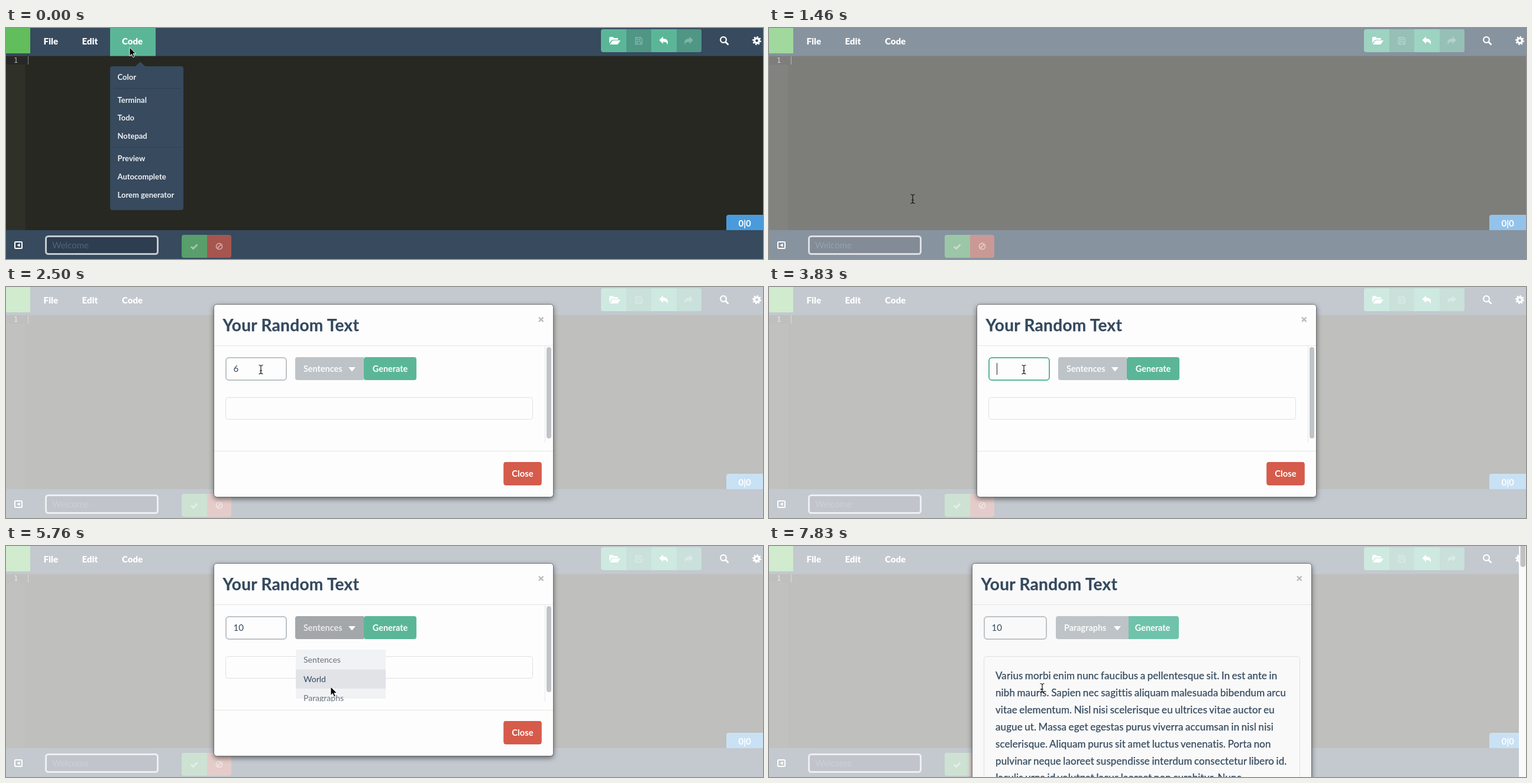
Animation, 1280 px wide and 392 px high, one loop 8000 ms. Source, as an HTML page:

```html
<!DOCTYPE html>
<html lang="en">
<head>
<meta charset="utf-8">
<title>Random text generator</title>
<style>
  html, body { margin: 0; width: 100%; height: 100%; overflow: hidden; background: #272822; }
  svg { display: block; width: 1280px; height: 392px; font-family: Lato, "Open Sans", sans-serif; }
  text { white-space: pre; }
  .nav { font-size: 15px; font-weight: 900; fill: #fff; }
  .item { font-size: 13px; font-weight: 700; fill: #eef1f3; }
  .btn { font-size: 14.4px; font-weight: 700; fill: #fff; }
  .field { font-size: 15px; fill: #34495e; }
  .opt { font-size: 14px; }
  .title { font-size: 28px; font-weight: 700; letter-spacing: .3px; fill: #34495e; }
  .lorem { font-size: 17px; letter-spacing: .1px; word-spacing: -1px; fill: #34495e; }
  .title, .lorem { stroke: #34495e; stroke-width: .25px; }
  #frame { stroke: #000; stroke-opacity: .45; filter: drop-shadow(0 3px 4.5px rgba(0, 0, 0, .5)); }
</style>
</head>
<body>
<svg viewBox="0 0 1280 392">
  <defs><clipPath id="bodyClip"><rect x="352" y="100" width="573" height="164"/></clipPath></defs>

  <!-- editor -->
  <rect width="1280" height="392" fill="#272822"/>
  <rect y="47" width="32.5" height="297" fill="#2f3129"/>
  <rect y="48" width="32.5" height="14" fill="#272727"/>
  <text x="13" y="59" font-size="12" fill="#b4b5ae" font-family="DejaVu Sans Mono, monospace">1</text>
  <rect x="37" y="48" width="1" height="14" fill="#86867f"/>
  <path d="M1218 343V321q0-4 4-4H1280V343z" fill="#4a9bdb"/>
  <text x="1238.5" y="336.5" font-size="15" font-weight="700" fill="#fff">0|0</text>

  <!-- header -->
  <rect width="1280" height="47.5" fill="#374a5e"/>
  <rect width="41" height="43" fill="#62bd5c"/>
  <rect id="codeTab" x="176" width="77" height="47.5" fill="#5bb698"/>
  <text class="nav" x="63.5" y="27.5">File</text>
  <text class="nav" x="128.5" y="27.5">Edit</text>
  <text class="nav" x="196" y="27.5">Code</text>
  <rect x="1006" y="2" width="170" height="39" rx="4" fill="#5bb698"/>
  <path d="M1049 2h42v39h-42zM1134 2h38q4 0 4 4v31q0 4-4 4h-38z" fill="#4f9685"/>
  <g fill="#fff">
    <path d="M1020 26V17q0-2 2-2h4l2 2h5q2 0 2 2v1h-9q-2 0-3 2z"/>
    <path d="M1021 28l4-6q.7-1 2-1h12l-4 6q-.7 1-2 1z"/>
    <path d="M1104.500 20.500l6.500-6v3.500c7 0 9.500 4 7.500 10.500c-.8-4-3-5-7.500-5v3.500z"/>
  </g>
  <path d="M1106 20.500l6.500-6v3.500c7 0 9.500 4 7.500 10.500c-.8-4-3-5-7.500-5v3.500z" fill="#80b5a8" transform="matrix(-1 0 0 1 2268 0)"/>
  <path d="M1064.500 16h8.500l2.500 2.500v9h-11zM1067 16v4h5v-4M1067 27v-4h6v4" fill="none" stroke="#80b5a8" stroke-width="1.5"/>
  <g fill="none" stroke="#fff">
    <circle cx="1213" cy="20" r="4.900" stroke-width="2.300"/>
    <path d="M1216.700 23.700l4 4" stroke-width="2.800" stroke-linecap="round"/>
    <circle cx="1269.500" cy="21.500" r="4" stroke-width="3.400"/>
    <circle cx="1269.500" cy="21.500" r="6.400" stroke-width="2.400" pathLength="16" stroke-dasharray="1"/>
  </g>

  <!-- footer -->
  <rect y="343" width="1280" height="49" fill="#374a5e"/>
  <rect x="15" y="363" width="12" height="11" rx="1.500" fill="none" stroke="#fff" stroke-width="2"/>
  <path d="M23.500 365.500v6l-5-3z" fill="#fff"/>
  <rect x="67.500" y="353.500" width="189" height="30" rx="4" fill="#2e3d50" stroke="#c5cbd1" stroke-width="3"/>
  <text x="78" y="374" font-size="15" fill="#50647a">Welcome</text>
  <path d="M340 351h-39q-4 0-4 4v31q0 4 4 4h39z" fill="#589f6c"/>
  <path d="M340 351h37q4 0 4 4v31q0 4-4 4h-37z" fill="#a6554f"/>
  <path d="M313 371l3.500 3.500l7-7" fill="none" stroke="#a5c9ae" stroke-width="2.800"/>
  <g fill="none" stroke="#cfa29e" stroke-width="1.900">
    <circle cx="360.500" cy="370.500" r="5"/><path d="M357 374l7-7"/>
  </g>

  <!-- drop-down menu -->
  <g id="menu">
    <path d="M217.500 66l9.500-8.500l9.500 8.500z" fill="#374a5e"/>
    <rect x="176" y="65" width="124" height="244" rx="4" fill="#374a5e"/>
    <path d="M180 102.500h116M180 202.500h116" stroke="#2f4154"/>
    <rect id="menuHit" x="180" width="116" height="31" rx="4" fill="#5bb698"/>
    <g id="menuItems"></g>
  </g>

  <rect id="veil" width="1280" height="392" fill="#fff"/>

  <!-- dialog -->
  <g id="dialog">
    <rect id="frame" x="351.500" y="29.500" width="574" rx="5"/>
    <text class="title" x="366.500" y="75">Your Random Text</text>
    <path d="M901 51.300l7.500 7.500M908.500 51.300l-7.500 7.500" stroke="#babdc0" stroke-width="2.400"/>
    <path d="M352 99.500h573" stroke="#e4e5e6"/>
    <rect id="box" x="372" y="120" height="38" rx="5" stroke-width="2"/>
    <text id="num" class="field" x="384.500" y="144"></text>
    <rect id="caret" y="129" width="1" height="20" fill="#222"/>
    <g id="gen">
      <rect x="605" y="119" width="89" height="39" rx="4" id="genBg"/>
      <text class="btn" x="649.500" y="144" text-anchor="middle">Generate</text>
    </g>
    <g id="unit">
      <path id="unitBg"/>
      <text id="unitText" class="btn" x="503" y="144"></text>
      <path id="tri" d="M579 136h12l-6 7.500z" fill="#fff"/>
    </g>
    <rect id="area" x="371.500" y="187.500" rx="4" fill="none" stroke="#dfe0e2"/>
    <g id="lorem"></g>
    <g id="list" clip-path="url(#bodyClip)">
      <rect x="490" y="176" width="152" height="83" fill="#f1f2f4"/>
      <rect id="listHit" x="490" width="152" height="32.500" fill="#e1e3e7"/>
      <g id="opts"></g>
    </g>
    <g id="lower">
      <path d="M911.500 100v164M352 278.500h573" stroke="#e4e5e6"/>
      <rect id="thumb" x="914" y="102" width="8" rx="4" fill="#c0c4c8"/>
      <rect x="841.500" y="297" width="64" height="39.500" rx="4" fill="#b94b3d"/>
      <rect x="841.500" y="297" width="64" height="38.500" rx="4" fill="#d65b4a"/>
      <text class="btn" x="873.500" y="322" text-anchor="middle" style="font-size:14.8px">Close</text>
    </g>
  </g>

  <g id="pageBar">
    <rect x="1268" width="12" height="392" fill="#fafafa"/>
    <rect x="1270.500" y="-6" width="8.500" height="41.500" rx="4" fill="#c1c1c1"/>
  </g>

  <path id="arrow" d="M0 0v14.500l3.400-3.200l2.300 5.500l2.500-1l-2.300-5.300h4.600z" stroke="#fff" stroke-width=".9"/>
  <path id="beam" d="M-3.500-7.500q3.500 0 3.500 2.500v10q0 2.500-3.500 2.500M3.500-7.500q-3.500 0-3.500 2.500v10q0 2.500 3.500 2.500M-2 2h4" fill="none" stroke="#111" stroke-width="1.200"/>
</svg>
<script>
const LOOP = 8000, STEP = 148.1, LEAD = 22, LAST = 53;
const TYPE = 29, OPEN = 37, PICK = 42, GROW = 47;

// step, x, y, text cursor
const path = [
  [0, 209, 33, 0], [2, 216, 84, 1], [8, 243, 290, 1], [11, 243, 290, 1],
  [12, 256, 280, 0], [14, 360, 185, 0], [16, 427, 142, 1], [17, 431, 140, 1],
  [31, 431, 140, 1], [33, 490, 141, 0], [35, 551, 142, 0], [37, 552, 144, 0],
  [39, 549, 239, 0], [40, 548, 252, 0], [42, 548, 252, 0], [45, 648, 143, 0],
  [48, 648, 143, 0], [50, 590, 178, 0], [51, 545, 215, 1], [52, 504, 243, 1],
  [53, 462, 241, 1]
];
const menu = [['Color', 83], ['Terminal', 122], ['Todo', 152.5], ['Notepad', 183],
  ['Preview', 221.5], ['Autocomplete', 252.5], ['Lorem generator', 283]];
const units = ['Sentences', 'World', 'Paragraphs'];
const lines = [
  'Varius morbi enim nunc faucibus a pellentesque sit. In est ante in',
  'nibh mauris. Sapien nec sagittis aliquam malesuada bibendum arcu',
  'vitae elementum. Nisl nisi scelerisque eu ultrices vitae auctor eu',
  'augue ut. Massa eget egestas purus viverra accumsan in nisl nisi',
  'scelerisque. Aliquam purus sit amet luctus venenatis. Porta non',
  'pulvinar neque laoreet suspendisse interdum consectetur libero id.',
  'Iaculis urna id volutpat lacus laoreet non curabitur. Nunc'
];

const $ = id => document.getElementById(id);
const set = (id, attrs) => { for (const a in attrs) $(id).setAttribute(a, attrs[a]); };
const show = (id, on) => set(id, { visibility: on ? 'visible' : 'hidden' });
const label = (cls, x, y, s) => `<text class="${cls}" x="${x}" y="${y}">${s}</text>`;

$('menuItems').innerHTML = menu.map(([s, y]) => label('item', 188.5, y + 4.7, s)).join('');
$('opts').innerHTML = units.map((s, i) => label('opt', 503, 198 + i * 32.5, s)).join('');
$('lorem').innerHTML = lines.map((s, i) => label('lorem', 391, 226 + i * 28.9, s)).join('');

function pointer(k) {
  const i = path.findIndex(p => p[0] > k);
  if (i < 0) return path[path.length - 1].slice(1);
  const a = path[i - 1], b = path[i], f = (k - a[0]) / (b[0] - a[0]);
  return [a[1] + (b[1] - a[1]) * f, a[2] + (b[2] - a[2]) * f, a[3]];
}

function render(k) {
  const [x, y, text] = pointer(k);
  const at = { transform: `translate(${x} ${y})` };
  set('arrow', at);
  set('beam', at);
  show('arrow', !text);
  show('beam', text);

  // menu
  const hit = menu.find(m => y >= m[1] - 16 && y < m[1] + 15);
  show('menu', k < 10);
  show('codeTab', k < 10);
  show('menuHit', k < 10 && hit);
  if (hit) set('menuHit', { y: hit[1] - 15.5 });

  // dialog entrance
  const grown = k >= GROW, paper = grown ? '#f9f9f9' : '#fdfdfd';
  const fade = k < 11 ? 0 : k === 11 ? .33 : k === 12 ? .83 : 1;
  const drop = k < 12 ? -318 : k === 12 ? -25 : 0;
  set('veil', { opacity: k < 10 ? 0 : k === 10 ? .4 : .7 });
  set('dialog', { opacity: fade, transform: `translate(${grown ? -8 : 0} ${drop})` });
  set('frame', { height: grown ? 800 : 327, fill: paper });

  // number field
  const focus = k >= 19 && k < 36;
  const value = k < 26 ? '6' : k < TYPE ? '' : k === TYPE ? '1' : '10';
  const edge = !focus ? '#bdc3c7' : k === 19 ? '#8dbdb0' : '#5bb698';
  set('box', { width: grown ? 105 : 102, stroke: edge, fill: paper });
  $('num').textContent = value;
  show('caret', focus && (k < 22 || k >= 26));
  set('caret', { x: 385 + value.length * 8.6 });

  // unit button and its list
  const picked = k >= PICK, open = k >= OPEN && k < PICK;
  const w = picked ? 123 : 116;
  set('unit', { transform: `translate(${grown ? 4 : 0} 0)` });
  set('unitBg', {
    d: `M${489 + w} 119H493q-4 0-4 4v31q0 4 4 4H${489 + w}z`,
    fill: open ? '#a3a7aa' : '#bdc3c7'
  });
  set('unitText', { 'fill-opacity': open ? .75 : .92 });
  $('unitText').textContent = picked ? units[2] : units[0];
  set('tri', { transform: `translate(${picked ? 8 : 0} 0)` });

  const row = Math.floor((y - 177) / 32.5);
  const over = k > OPEN && k <= PICK && row >= 0 && row < 3 ? row : -1;
  set('list', { opacity: k === OPEN ? .5 : k === PICK ? .4 : open ? 1 : 0 });
  show('listHit', over >= 0);
  set('listHit', { y: 177 + Math.max(over, 0) * 32.5 });
  [...$('opts').children].forEach((o, i) => o.setAttribute('fill', i === over ? '#34495e' : '#66727f'));
  set('thumb', { height: open ? 146 : 155 });

  // result
  set('gen', { transform: `translate(${grown ? 7 : 0} 0)` });
  set('genBg', { fill: k >= 45 ? '#6fc3aa' : '#5bb698' });
  set('area', { width: grown ? 534 : 519, height: grown ? 600 : 37 });
  show('lorem', grown);
  show('lower', !grown);
  show('pageBar', grown);
}

let start, shown = -1;
function tick(now) {
  start ??= now;
  const k = Math.min(LAST, Math.floor(((now - start) % LOOP + LEAD) / STEP));
  if (k !== shown) render(shown = k);
  requestAnimationFrame(tick);
}
render(0);
requestAnimationFrame(tick);
</script>
</body>
</html>
```
